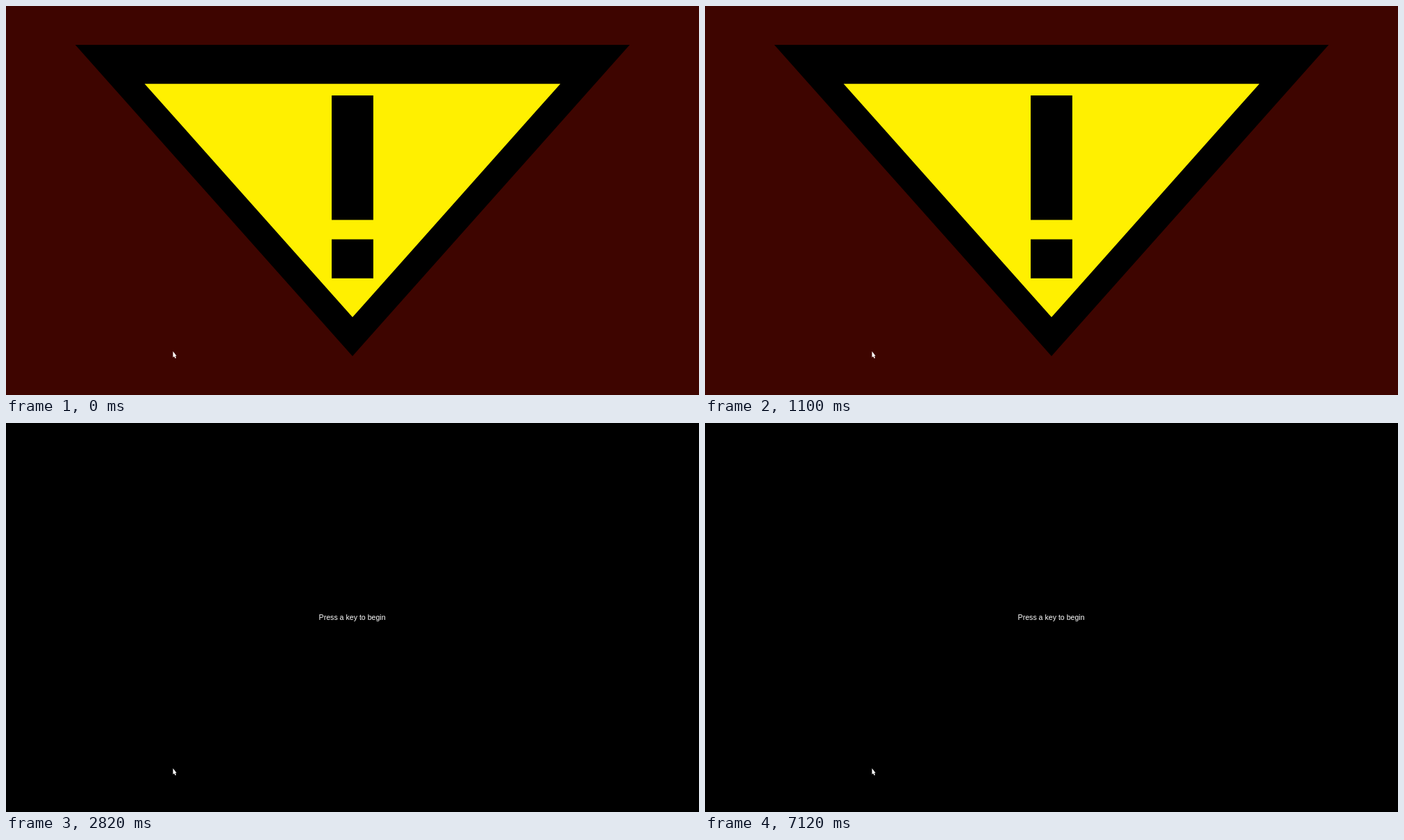
An HTML page for the animation above (8 s loop, 998 by 561 pixels).

```html
<!DOCTYPE html>
<html lang="en">
<head>
<meta charset="utf-8">
<title>Warning, then start prompt</title>
<style>
  html, body { margin: 0; width: 100%; height: 100%; overflow: hidden; background: #000; }
  svg { display: block; width: 100vw; height: 100vh; }
  .prompt { font: 10.6px "Liberation Sans", Arial, sans-serif; fill: #fff; text-anchor: middle; }
  .warning { animation: cut 8s step-end infinite; }
  /* The warning gives way to the prompt at 1120 ms. */
  @keyframes cut {
    0% { visibility: visible; }
    14%, 100% { visibility: hidden; }
  }
</style>
</head>
<body>
<svg viewBox="0 0 998 561">
  <rect width="998" height="561"/>
  <text class="prompt" x="498.6" y="284">Press a key to begin</text>
  <g class="warning">
    <rect width="998" height="561" fill="#3e0500"/>
    <path d="M99.8 56.1H898.2L499 504.9Z"/>
    <path d="M199.6 112.2H798.4L499 448.8Z" fill="#fff000"/>
    <path d="M469 129h60v179.5h-60zM469 336.6h60v56.1h-60z"/>
  </g>
  <path class="cursor" d="M240.5 498v8.8l1.8-1.6 1.4 3 1.3-.6-1.3-2.9h2z" fill="#fff"/>
</svg>
</body>
</html>
```
